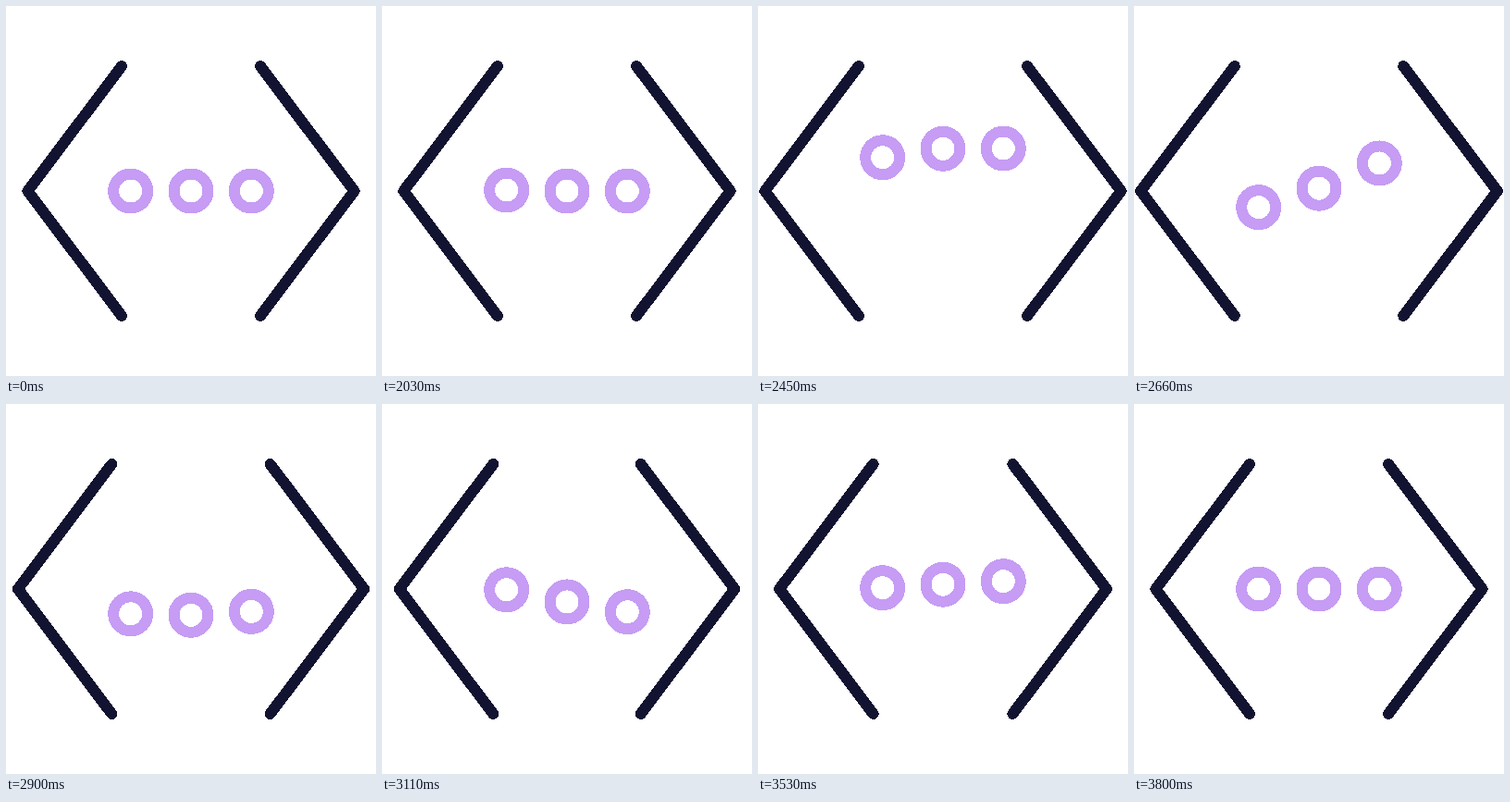
Write an HTML page that moves like this. It is 400 px wide and 400 px high and loops after 3830 ms.

```html
<!DOCTYPE html>
<html lang="en">
<head>
<meta charset="utf-8">
<title>Code brackets</title>
<style>
  html, body { margin: 0; width: 100%; height: 100%; overflow: hidden; background: #fff; }
  svg { display: block; width: 100%; height: 100%; }
</style>
</head>
<body>
<svg viewBox="0 0 400 400" fill="none" stroke-width="12" stroke-linecap="round" stroke-linejoin="round" shape-rendering="crispEdges">
  <g stroke="#121331">
    <path class="bracket" d="M125 65 23.5 200 125 335"/>
    <path class="bracket" d="M275 65 376.5 200 275 335"/>
  </g>
  <g stroke="#c69cf4">
    <circle class="dot" cx="134.7" cy="200" r="18.5"/>
    <circle class="dot" cx="200" cy="200" r="18.5"/>
    <circle class="dot" cx="265.3" cy="200" r="18.5"/>
  </g>
</svg>
<script>
const LOOP = 3830, REST = 2000, STEP = 30, DOT_DELAY = 3;

// Same curve as CSS cubic-bezier(x1, 0, x2, 1), solved by bisection.
function ease(t, x1, x2) {
  let low = 0, high = 1, u;
  for (let i = 0; i < 24; i++) {
    u = (low + high) / 2;
    const v = 1 - u, x = 3 * u * v * (v * x1 + u * x2) + u ** 3;
    if (x < t) low = u; else high = u;
  }
  return u * u * (3 - 2 * u);
}

// Each key gives the step at which a value is reached and the easing towards it.
function valueAt(keys, step) {
  let from = 0, start = 0;
  for (const { at, to, x1 = 0.4, x2 = 0.6 } of keys) {
    if (step < at) {
      const t = Math.max(0, (step - start) / (at - start));
      return from + (to - from) * ease(t, x1, x2);
    }
    from = to;
    start = at;
  }
  return from;
}

const bounce = [
  { at: 10, to: -47 },
  { at: 28, to: 28.5, x1: 0.52, x2: 0.38 },
  { at: 42, to: -9.6 },
  { at: 54, to: 0 }
];
const spread = [
  { at: 18, to: 16.8, x2: 0.5 },
  { at: 58, to: 0, x1: 0.35, x2: 0.27 }
];

const brackets = document.querySelectorAll('.bracket');
const dots = document.querySelectorAll('.dot');
const begin = performance.now();

function draw() {
  const time = (performance.now() - begin) % LOOP;
  const step = Math.max(0, Math.floor((time - REST) / STEP));
  const shift = valueAt(spread, step);
  brackets.forEach((el, i) => el.setAttribute('transform', `translate(${i ? shift : -shift} 0)`));
  dots.forEach((el, i) => el.setAttribute('cy', 200 + valueAt(bounce, step - i * DOT_DELAY)));
  requestAnimationFrame(draw);
}
draw();
</script>
</body>
</html>
```
